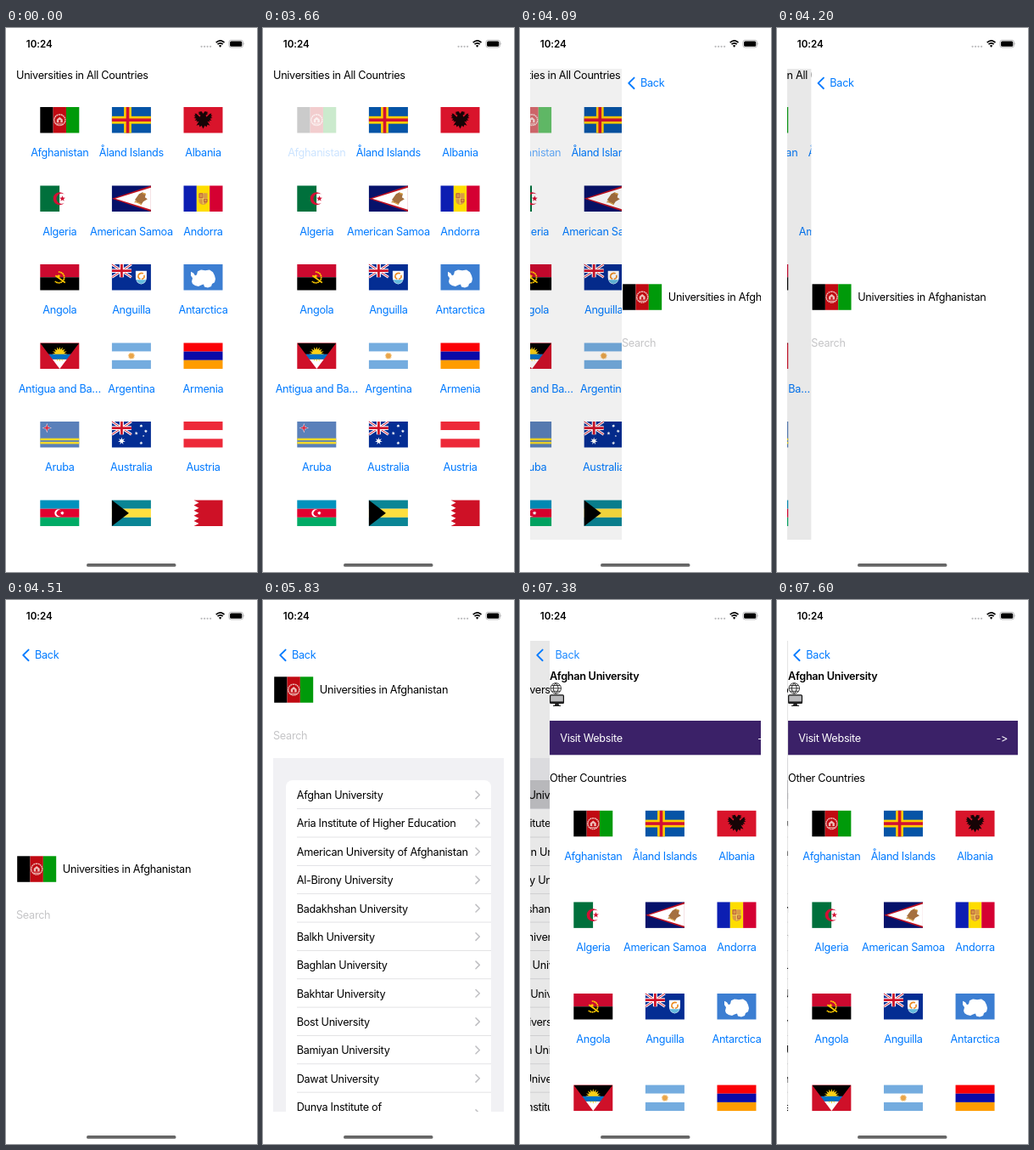
An HTML page for the animation above (7.68 s loop, 296 by 640 pixels).

```html
<!DOCTYPE html>
<html lang="en">
<head>
<meta charset="utf-8">
<title>University browser</title>
<style>
html, body { margin: 0; width: 100%; height: 100%; overflow: hidden; background: #fff; }
svg { display: block; width: 296px; height: 640px; }
text { font: 400 12.7px Inter, "Noto Sans", sans-serif; letter-spacing: -.3px; white-space: pre; }
.link { fill: #007aff; }
.mid { text-anchor: middle; }
.end { text-anchor: end; }
.bold { font-weight: 600; }
.light { fill: #fff; }
.clock { font-size: 11.6px; font-weight: 600; letter-spacing: -.05px; }
.hint { fill: #c5c5c7; }
.round { stroke-linecap: round; stroke-linejoin: round; }
</style>
</head>
<body>
<svg id="stage" viewBox="0 0 296 640" xmlns="http://www.w3.org/2000/svg"></svg>
<script>
const LOOP = 7680;
const PAGE = { x: 12, y: 48, w: 272, h: 554 };
const FLAG = { w: 46, h: 31, squash: .983 };
const PRESS = 3660, LOADED = 5830;
const FIRST_PUSH = { start: 3966, steps: [3990, 4090, 4200, 4300, 4410, 4510] };
const SECOND_PUSH = { start: 7130, steps: [7150, 7270, 7380, 7490, 7600] };

const rect = (x, y, w, h, fill, more = '') =>
  `<rect x="${x}" y="${y}" width="${w}" height="${h}" fill="${fill}" ${more}/>`;
const disc = (x, y, r, fill) => `<circle cx="${x}" cy="${y}" r="${r}" fill="${fill}"/>`;
const shape = (d, fill, more = '') => `<path d="${d}" fill="${fill}" ${more}/>`;
const line = (d, color, width, more = '') =>
  `<path d="${d}" fill="none" stroke="${color}" stroke-width="${width}" ${more}/>`;
const text = (x, y, str, cls = '', more = '') => `<text x="${x}" y="${y}" class="${cls}" ${more}>${str}</text>`;
const group = (id, body, more = '') => `<g id="${id}" ${more}>${body}</g>`;

// Flags, each drawn in a 46 by 31 box
const field = fill => rect(0, 0, FLAG.w, FLAG.h, fill);
const bands = (...colors) => colors.map((c, i) =>
  rect(0, i * FLAG.h / colors.length, FLAG.w, FLAG.h / colors.length, c)).join('');
const pales = (...colors) => colors.map((c, i) =>
  rect(i * FLAG.w / colors.length, 0, FLAG.w / colors.length, FLAG.h, c)).join('');
function star(x, y, r, fill, points = 5, inner = .42) {
  const pts = Array.from({ length: points * 2 }, (_, i) => {
    const a = i * Math.PI / points - Math.PI / 2, d = i % 2 ? r * inner : r;
    return `${(x + d * Math.cos(a)).toFixed(2)},${(y + d * Math.sin(a)).toFixed(2)}`;
  });
  return `<polygon points="${pts.join(' ')}" fill="${fill}"/>`;
}
function crescent(x, y, r, fill) {
  const tip = x + r * .75, rise = r * .66, inner = r * .8;
  return shape(`M${tip} ${y - rise}A${r} ${r} 0 1 0 ${tip} ${y + rise}A${inner} ${inner} 0 1 1 ${tip} ${y - rise}z`, fill);
}
const unionJack = navy => field(navy) +
  line('M0 0L23 15.5M23 0L0 15.5', '#fff', 3) + line('M0 0L23 15.5M23 0L0 15.5', '#cf142b', 1) +
  line('M11.5 0V15.5M0 7.75H23', '#fff', 5) + line('M11.5 0V15.5M0 7.75H23', '#cf142b', 2.8);

const flags = [
  ['Afghanistan', pales('#000', '#c00a12', '#009a0a') +
    line('M23 9a6.5 6.5 0 1 0 .1 0', '#edbdb8', 1.5, 'stroke-dasharray="1.8 .5"') +
    shape('M19.5 18.5v-3.5l3.5-3 3.5 3v3.5z', '#edbdb8') + rect(22, 15.3, 2, 3.2, '#c00a12') +
    line('M19 20.3h8', '#edbdb8', 1)],
  ['Åland Islands', field('#0654a6') + rect(14.2, 0, 8.8, 31, '#ffce00') + rect(0, 11, 46, 9, '#ffce00') +
    rect(16.8, 0, 3.6, 31, '#d21034') + rect(0, 13.7, 46, 3.6, '#d21034')],
  ['Albania', field('#d9142b') +
    shape('M23 8l-2-3-4 1 2 1.5-2 .5 3 2-1 2-4-4-2 0 1 2-2 0 2 2-2 1 3 1-2 2 3 0-1 2 3-1-3 5 3-1 1 3 2-2 2 4 2-4 2 2 1-3 3 1-3-5 3 1-1-2 3 0-2-2 3-1-2-1 2-2-2 0 1-2-2 0-4 4-1-2 3-2-2-.5 2-1.5-4-1z', '#160406')],
  ['Algeria', pales('#00703c', '#fff') + crescent(23, 15.5, 7.6, '#d21034') + star(26.2, 15.5, 3.6, '#d21034')],
  ['American Samoa', field('#06126a') + shape('M0 15.5L46 0V31z', '#bd1021') + shape('M4 15.5L46 2.2V28.8z', '#fff') +
    shape('M27 17l5-7 4-2 4 2-1 4 3 2-5 3-2 3-4-2-5 0 3-2z', '#a5703f') +
    line('M27 18.5l8 4M36 9l4 1', '#d8a040', 1.2)],
  ['Andorra', pales('#0c1eb2', '#fedd00', '#d50032') + shape('M18 9h10v9q0 4-5 5-5-1-5-5z', '#d99a45') +
    line('M23 9v13M18 15.5h10', '#f2d05a', 1.2) + line('M18.5 9.5h4v5h-4zM24 16h3.5v3.5H24z', '#b6583b', .9)],
  ['Angola', bands('#cc092f', '#000') +
    line('M21.5 9.2a6.5 6.5 0 1 1-4 11.3', '#ffcb00', 1.7, 'stroke-dasharray="2 .4"') +
    line('M18 13.5L29.5 22', '#ffcb00', 1.8) + star(21.8, 14.2, 2.5, '#ffcb00')],
  ['Anguilla', unionJack('#042d93') + shape('M28 8h13v8q0 6-6.5 8-6.5-2-6.5-8z', '#fff') +
    shape('M28.6 18.5h11.8q-1.5 3.8-5.9 5-4.4-1.2-5.9-5z', '#62b9dd') +
    line('M31 13.5q2-4 6-2.5M38 13q1 4-3 4.5M33.5 17.5q-3-1-2.5-4', '#ec8c23', 1.6)],
  ['Antarctica', field('#3c7ed2') +
    shape('M8.5 9l3 1.5 2 3 2-1 1-4 4-2 5 1 5-1 4 3 2 4 1 4-1 4-3 2-1 3-4 1.5-4-1-1-3-3 1-3 1.5-4-1-3-2-1-3 1-4-2-3z', '#fff')],
  ['Antigua and Ba…', field('#cf1029') + '<g clip-path="url(#delta)">' + rect(0, 0, 46, 13.5, '#000') +
    rect(0, 19.5, 46, 12, '#fff') + star(23, 13.5, 9, '#fcd116', 16, .6) +
    rect(0, 13.5, 46, 6, '#0072c6') + '</g>'],
  ['Argentina', bands('#74acdf', '#fff', '#74acdf') + star(23, 15.5, 4.5, '#f0b45c', 16, .65) +
    disc(23, 15.5, 2.6, '#e9a54b')],
  ['Armenia', bands('#fb0006', '#0a0aa8', '#ff9c00')],
  ['Aruba', field('#5a80ba') + rect(0, 20, 46, 2.5, '#f4da29') + rect(0, 24.3, 46, 2.5, '#f4da29') +
    star(8, 7.7, 5.7, '#fff', 4, .32) + star(8, 7.7, 4.6, '#d7243c', 4, .3)],
  ['Australia', unionJack('#042d93') + star(11.5, 23.3, 4.5, '#fff', 7) + star(34.5, 25.7, 2.2, '#fff', 7) +
    star(28.8, 14, 2.2, '#fff', 7) + star(34.5, 5.2, 2.2, '#fff', 7) + star(40, 11.5, 2.2, '#fff', 7) +
    star(37.2, 17.2, 1.3, '#fff')],
  ['Austria', bands('#ed2939', '#fff', '#ed2939')],
  ['Azerbaijan', bands('#0092bd', '#e2002f', '#00ab66') + crescent(21.5, 15.5, 4.5, '#fff') +
    star(26, 15.5, 2.5, '#fff', 8, .5)],
  ['Bahamas', bands('#0a8595', '#ffdf3f', '#0a8595') + shape('M0 0L20 15.5L0 31z', '#000')],
  ['Bahrain', shape('M46 0H12' + 'l6 3.1l-6 3.1'.repeat(5) + 'H46z', '#ce1126')],
];

const flagAt = (i, x, y) => `<use href="#flag${i}" x="${x}" y="${y}"/>`;
const grid = (id, top, pitch, count) => flags.slice(0, count).map(([name], i) => {
  const mid = 63.3 + i % 3 * 84.6, y = top + Math.floor(i / 3) * pitch;
  return group(`${id}${i}`, flagAt(i, mid - FLAG.w / 2, y) + text(mid, y + 58, name, 'link mid'));
}).join('');

// Pages
const backdrop = rect(PAGE.x, PAGE.y, PAGE.w, PAGE.h, '#fff');
const shade = id => rect(PAGE.x, PAGE.y, PAGE.w, PAGE.h, '#000', `id="${id}" opacity="0"`);
const chevron = line('M26.6 58.6L20.2 64.9L26.6 71.2', '#007aff', 1.9, 'class="round"');
const back = id => text(34, 69.2, 'Back', 'link', `id="${id}"`);

const universities = ['Afghan University', 'Aria Institute of Higher Education', 'American University of Afghanistan',
  'Al-Birony University', 'Badakhshan University', 'Balkh University', 'Baghlan University', 'Bakhtar University',
  'Bost University', 'Bamiyan University', 'Dawat University', 'Dunya Institute of'];

const listRow = (name, i) => {
  const y = 212.3 + i * 33.35, arrow = y + (i === universities.length - 1 ? 25 : 17);
  return (i ? rect(40, y - .4, 229, .8, '#dcdcdf') : '') + text(39.7, y + 21.8, name) +
    line(`M251 ${arrow - 4.3}l4.3 4.3l-4.3 4.3`, '#3c3c43', 1.5, 'class="round" opacity=".32"');
};

const home = backdrop + text(12, 60.2, 'Universities in All Countries') + grid('home', 93, 92.5, 18) + shade('homeShade');

const country = backdrop +
  group('header', flagAt(0, 13.2, 90.3) + text(66.8, 110.2, 'Universities in Afghanistan') + text(12, 164.2, 'Search', 'hint')) +
  group('list', rect(12, 186, 272, 420, '#f1f1f4') + rect(27, 212, 242, 420, '#fff', 'rx="8"') +
    shape('M27 245.5V220a8 8 0 0 1 8-8H261a8 8 0 0 1 8 8V245.5z', '#cacacd', 'id="pressed"') +
    universities.map(listRow).join('')) + shade('countryShade');

const globe = line('M19.2 97.7a6.2 6.2 0 1 0 .1 0M19.2 97.7q-6 6.2 0 12.4q6-6.2 0-12.4M13 103.9H25.4M14.3 100.5H24.1M14.3 107.3H24.1', '#222', .9);
const monitor = rect(12.6, 111.8, 15.8, 9.6, '#b9b9bb', 'rx="1" stroke="#111" stroke-width="1.2"') +
  rect(12.6, 119.4, 15.8, 2, '#222') + shape('M18.5 122h4l.8 2h1.7v1H16v-1h1.7z', '#222');
const school = backdrop + text(12, 93.6, 'Afghan University', 'bold') + globe + monitor +
  rect(12, 142, 272, 40.3, '#3b2168') + text(24.2, 167, 'Visit Website', 'light') +
  text(271, 167, '-&gt;', 'light end') +
  text(12, 214.4, 'Other Countries') + grid('other', 247.8, 107.6, 12);

const statusBar = text(23.8, 23, '10:24', 'clock') +
  [0, 1, 2, 3].map(i => disc(230.6 + i * 3.5, 21.8, 1.15, '#bcbcbe')).join('') +
  line('M247.7 17.2q4.9-4.5 9.8 0M249.5 19.2q3.1-2.8 6.2 0', '#000', 1.6) +
  shape('M250.9 20.8q1.7-1.4 3.4 0l-1.7 1.9z', '#000') +
  rect(262.9, 14.3, 16.6, 8.6, 'none', 'rx="2.5" stroke="#a9a9ab" stroke-width=".8"') +
  rect(264.1, 15.5, 14.2, 6.2, '#000', 'rx="1.5"') + shape('M280.5 17.1q1.5 1.5 0 3z', '#a9a9ab');

const stage = document.getElementById('stage');
stage.innerHTML = '<defs>' +
  `<clipPath id="window">${rect(PAGE.x, PAGE.y, PAGE.w, PAGE.h, '#000')}</clipPath>` +
  '<clipPath id="delta"><path d="M0 0H46L23 31z"/></clipPath>' +
  flags.map(([, art], i) => group(`flag${i}`, group(`art${i}`, art, `transform="scale(1 ${FLAG.squash})"`))).join('') +
  '</defs>' + rect(0, 0, 296, 640, '#fff') + statusBar +
  '<g clip-path="url(#window)">' + group('home', home) + group('country', country) + group('school', school) +
  group('nav', chevron + back('oldBack') + back('newBack')) + '</g>' +
  rect(95, 630, 105.5, 3.8, '#666', 'rx="1.9"');

const el = id => document.getElementById(id);
const show = (id, on) => el(id).setAttribute('display', on ? 'inline' : 'none');
const slide = (id, x, y = 0) => el(id).setAttribute('transform', `translate(${x.toFixed(2)} ${y})`);
const fade = (id, value) => el(id).setAttribute('opacity', Math.max(0, Math.min(1, value)).toFixed(3));

const held = (t, steps) => steps.filter(s => s <= t).pop();

// Critically damped spring, sampled at the held steps
function progress(t, { start, steps }) {
  const at = held(t, steps);
  if (at === undefined) return 0;
  const k = (at - start) * .0164;
  const p = 1 - (1 + k) * Math.exp(-k);
  return p > .998 ? 1 : p;
}

// A page enters from the right, then drifts left and darkens under the next one
function placePage(id, entering, leaving) {
  show(id, entering > 0 && leaving < 1);
  slide(id, PAGE.w * (1 - entering - .3 * leaving));
  if (el(id + 'Shade')) fade(id + 'Shade', .1 * leaving);
}

function buttonOpacity(t) {
  if (t < PRESS) return 1;
  const at = held(t, FIRST_PUSH.steps);
  return at === undefined ? .2 : .2 + (at - 3970) / 300;
}

function draw(t) {
  const first = progress(t, FIRST_PUSH), second = progress(t, SECOND_PUSH);
  placePage('home', 1, first);
  placePage('country', first, second);
  placePage('school', second, 0);

  fade('home0', buttonOpacity(t));
  slide('header', 0, t < LOADED ? 211 : 0);
  show('list', t >= LOADED);
  show('pressed', t >= SECOND_PUSH.steps[0]);

  show('nav', first > 0);
  slide('nav', PAGE.w * (1 - first));
  slide('oldBack', -34 * second);
  fade('oldBack', 1 - 1.5 * second);
  slide('newBack', 90 * (1 - second));
  fade('newBack', second * 1.3 - .3);
}

const origin = performance.now();
function tick() {
  draw((performance.now() - origin) % LOOP);
  requestAnimationFrame(tick);
}
draw(0);
requestAnimationFrame(tick);
</script>
</body>
</html>
```
